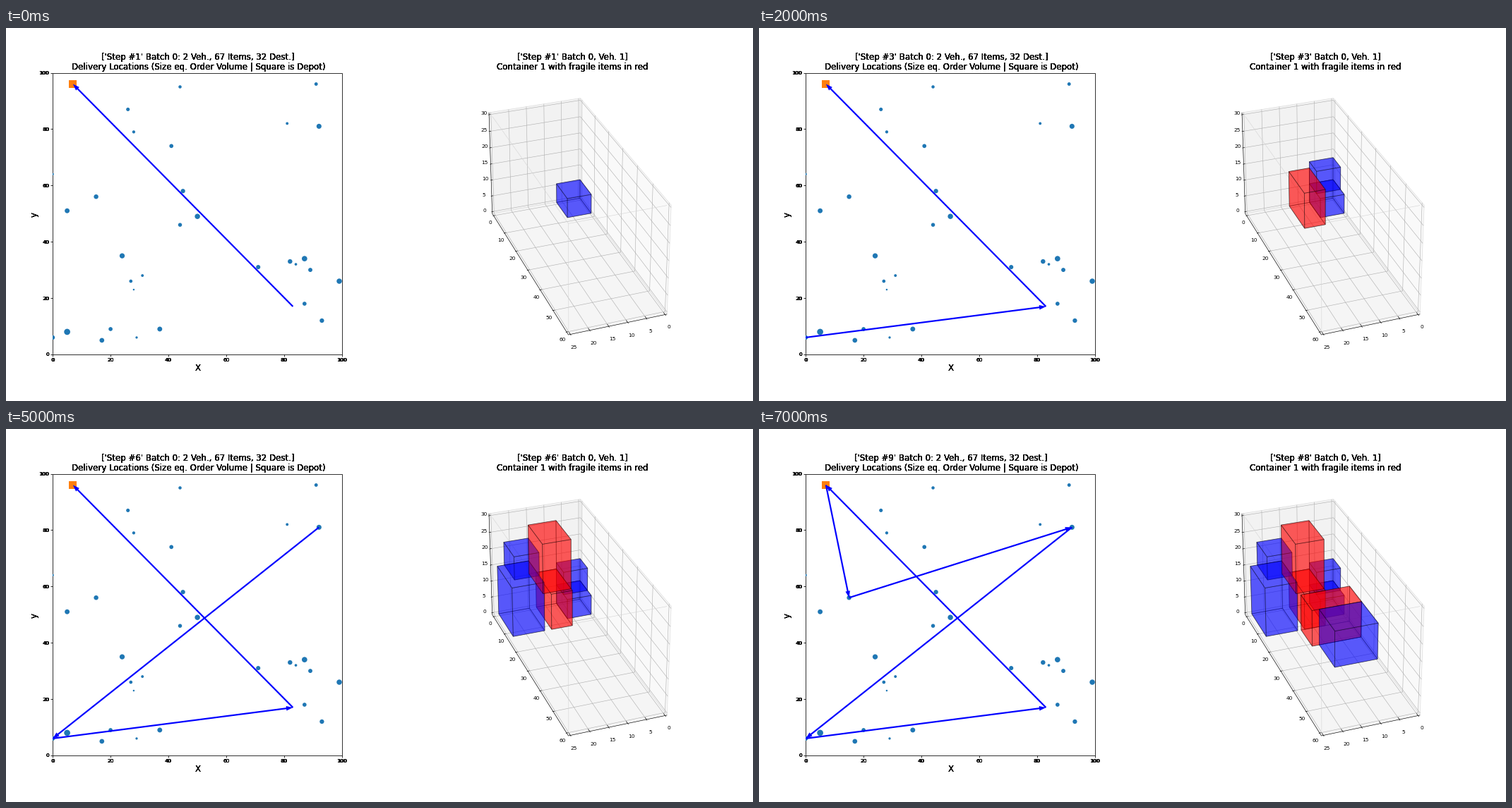
A matplotlib script for the animation above (8 s loop, 1058 px wide and 529 px high).

```python
import itertools

import matplotlib.pyplot as plt
import numpy as np
from matplotlib.animation import FuncAnimation
from matplotlib.patches import Polygon, Rectangle

plt.rcParams["font.family"] = "DejaVu Sans"
WIDTH, HEIGHT, PT = 1058, 529, 0.72  # PT: points per pixel at 100 dpi

fig = plt.figure(figsize=(WIDTH / 100, HEIGHT / 100), dpi=100, facecolor="white")
ax = fig.add_axes([0, 0, 1, 1])
ax.set_xlim(0, WIDTH)
ax.set_ylim(HEIGHT, 0)
ax.axis("off")


def line(points, color="black", width=0.6, zorder=2):
    xs, ys = np.transpose(points)
    return ax.plot(xs, ys, color=color, lw=width * PT, zorder=zorder,
                   solid_capstyle="butt")[0]


def text(x, y, label, size=7.35, copies=1, ha="center", va="center", **kw):
    """Stacked copies darken the antialiased glyph edges."""
    return [ax.text(x, y, label, fontsize=size * PT, ha=ha, va=va, **kw)
            for _ in range(copies)]


def title(x):
    return text(x, 58.7, "", 11.76, 5, va="baseline", linespacing=1.12)


# --- Delivery map ---------------------------------------------------------
LEFT, RIGHT, TOP, BOTTOM = 66.1, 476.1, 63.5, 462.9
DEPOT = (7, 96)
BLUE, ORANGE = "#1f77b4", "#ff7f0e"

# x, y, radius in pixels
STOPS = [
    (44, 95, 2.1), (91, 96, 2.3), (26, 87, 2.4), (81, 82, 1.8), (92, 81, 3.4),
    (28, 79, 2.0), (41, 74, 2.7), (0, 64, 1.5), (45, 58, 3.0), (15, 56, 3.1),
    (5, 51, 3.3), (50, 49, 3.6), (44, 46, 2.6), (24, 35, 3.5), (87, 34, 3.7),
    (82, 33, 3.1), (84, 32, 1.7), (71, 31, 2.9), (89, 30, 2.8), (31, 28, 1.8),
    (27, 26, 2.2), (99, 26, 3.6), (28, 23, 1.1), (87, 18, 2.7), (93, 12, 3.0),
    (20, 9, 2.7), (37, 9, 3.3), (5, 8, 4.2), (0, 6, 3.0), (29, 6, 1.5),
    (17, 5, 3.2),
]


def on_map(x, y):
    return np.array([LEFT + (RIGHT - LEFT) * x / 100,
                     BOTTOM - (BOTTOM - TOP) * y / 100])


def arrow(start, end):
    tail, tip = on_map(*start), on_map(*end)
    along = (tip - tail) / np.hypot(*(tip - tail))
    side = np.array([-along[1], along[0]]) * 3.3
    base = tip - 9.5 * along
    head = Polygon([tip, base + side, base - side], fc="blue", lw=0, zorder=6)
    return [line([tail, base + along], "blue", 2.2, 6), ax.add_patch(head)]


def draw_map():
    frame = Rectangle((LEFT, TOP), RIGHT - LEFT, BOTTOM - TOP, fc="none",
                      ec="black", lw=0.8 * PT, zorder=3)
    ax.add_patch(frame)
    x, y, radius = np.transpose(STOPS)
    dots = ax.scatter(*on_map(x, y), s=(2 * radius * PT + 0.2) ** 2, c=BLUE,
                      lw=0, zorder=4)
    dots.set_clip_path(frame)
    cx, cy = on_map(*DEPOT)
    ax.add_patch(Rectangle((cx - 5.5, cy - 5.5), 11, 11, fc=ORANGE, lw=0,
                           zorder=5))
    for value in range(0, 101, 20):
        px, py = on_map(value, value)
        line([(px, BOTTOM), (px, BOTTOM + 3)], width=0.8)
        line([(LEFT - 3, py), (LEFT, py)], width=0.8)
        for shift in (-0.4, 0.4):
            text(px + shift, BOTTOM + 8, value, copies=2, va="center_baseline")
            text(LEFT - 4.9 + shift, py, value, copies=2, ha="right",
                 va="center_baseline")
    text(271.5, 483, "X", 11.76, 4)
    text(40, 264, "y", 11.76, 4, rotation=90)


# --- Container view -------------------------------------------------------
SIZE = np.array([25, 60, 30])
MARGIN = SIZE / 48
LOW, HIGH = -MARGIN, SIZE + MARGIN
ELEV, AZIM = np.radians([30, 70])
DISTANCE, FOCAL, CENTRE = 375.7, 2064, (805.5, 257.7)


def view(point):
    """Camera coordinates: right, up and distance from the eye."""
    w, l, z = np.asarray(point) - SIZE / 2
    toward = np.cos(AZIM) * w + np.sin(AZIM) * l
    return (-np.sin(AZIM) * w + np.cos(AZIM) * l,
            np.cos(ELEV) * z - np.sin(ELEV) * toward,
            DISTANCE - np.cos(ELEV) * toward - np.sin(ELEV) * z)


def project(point):
    right, up, depth = view(point)
    return CENTRE[0] + FOCAL * right / depth, CENTRE[1] - FOCAL * up / depth


def line3d(points, color="black", width=0.6, zorder=2):
    return line([project(p) for p in points], color, width, zorder)


def face(low, high, axis, level):
    """Corners of the box side where the given axis is fixed at level."""
    a, b = [i for i in range(3) if i != axis]
    corners = []
    for u, v in ((low[a], low[b]), (high[a], low[b]),
                 (high[a], high[b]), (low[a], high[b])):
        corner = [level] * 3
        corner[a], corner[b] = u, v
        corners.append(corner)
    return corners


def draw_face(corners, **style):
    return ax.add_patch(Polygon([project(c) for c in corners], **style))


def draw_container():
    (w0, l0, z0), (w1, l1, z1) = LOW, HIGH
    for axis, shade in enumerate((0.975, 0.95, 0.9625)):
        draw_face(face(LOW, HIGH, axis, LOW[axis]), fc=str(shade), ec="0.88",
                  lw=0.75 * PT, zorder=0)
    grid = dict(color="#b0b0b0", zorder=1)
    for w in range(0, 26, 5):
        line3d([(w, l1, z0), (w, l0, z0), (w, l0, z1)], **grid)
        line3d([(w, l1 + 0.5, z0), (w, l1 - 1, z0)])
        text(*project((w, l1 + 2.6, z0 - 2.1)), w)
    for l in range(0, 61, 10):
        line3d([(w1, l, z0), (w0, l, z0), (w0, l, z1)], **grid)
        line3d([(w1 + 0.22, l, z0), (w1 - 0.43, l, z0)])
        text(*project((w1 + 1.1, l, z0 - 2)), l)
    for z in range(0, 31, 5):
        line3d([(w1, l0, z), (w0, l0, z), (w0, l1, z)], **grid)
        line3d([(w1 + 0.22, l0, z), (w1 - 0.43, l0, z)])
        text(675 - z / 10, project((w1, l0, z))[1] - 1.5, z, ha="left")
    line3d([(w1, l0, z0), (w1, l0, z1)])
    line3d([(w1, l0, z0), (w1, l1, z0)])
    line3d([(w1, l1, z0), (w0, l1, z0)])
    # Pale outline of the load space, meeting at its nearest top corner.
    w, l, z = SIZE
    for end in ((w, 0, z), (0, l, z), (w, l, 0)):
        line3d([end, SIZE], "0.84", 0.6, 1)


def item(origin, size, color):
    low, high = np.array(origin), np.add(origin, size)
    faces = []
    for bound, axis in itertools.product((low, high), range(3)):
        corners = face(low, high, axis, bound[axis])
        nearest = min(view(c)[2] for c in corners)
        # Sides of all items interleave by depth, far ones first.
        faces.append(draw_face(corners, fc=(color, 0.4), ec=("black", 0.4),
                               lw=0.8 * PT, zorder=4 - nearest / DISTANCE))
    return faces


# origin (w, l, z), size, colour; listed in loading order
ITEMS = [
    ((0, 0, 0), (7, 9, 6), "blue"),
    ((0, 0, 6), (7, 6, 7), "blue"),
    ((7, 0, 0), (6, 13, 11), "red"),
    ((7, 0, 11), (8, 12, 15), "red"),
    ((15, 0, 0), (9, 13, 15), "blue"),
    ((15, 0, 15), (7, 9, 7), "blue"),
    ((0, 13, 0), (14, 9, 11), "red"),
    ((0, 22, 0), (12, 12, 11), "blue"),
]

# start, end, step at which the leg appears
LEGS = [
    ((83, 17), DEPOT, 0),
    ((0, 6), (83, 17), 1),
    ((92, 81), (0, 6), 4),
    ((15, 56), (92, 81), 7),
    (DEPOT, (15, 56), 7),
]

draw_map()
draw_container()
timed = [(part, start) for start, spec in enumerate(ITEMS) for part in item(*spec)]
timed += [(part, start) for a, b, start in LEGS for part in arrow(a, b)]
map_title, load_title = title(272.3), title(802)


def update(step):
    for part, start in timed:
        part.set_visible(step >= start)
    load_step = step + 1
    map_step = 9 if step == 7 else load_step
    for label in map_title:
        label.set_text(f"['Step #{map_step}' Batch 0: 2 Veh., 67 Items, 32 Dest.]\n"
                       "Delivery Locations (Size eq. Order Volume | Square is Depot)")
    for label in load_title:
        label.set_text(f"['Step #{load_step}' Batch 0, Veh. 1]\n"
                       "Container 1 with fragile items in red")
    return []


anim = FuncAnimation(fig, update, frames=8, interval=1000, repeat=True,
                     repeat_delay=0, init_func=lambda: update(0))
plt.show()
```
